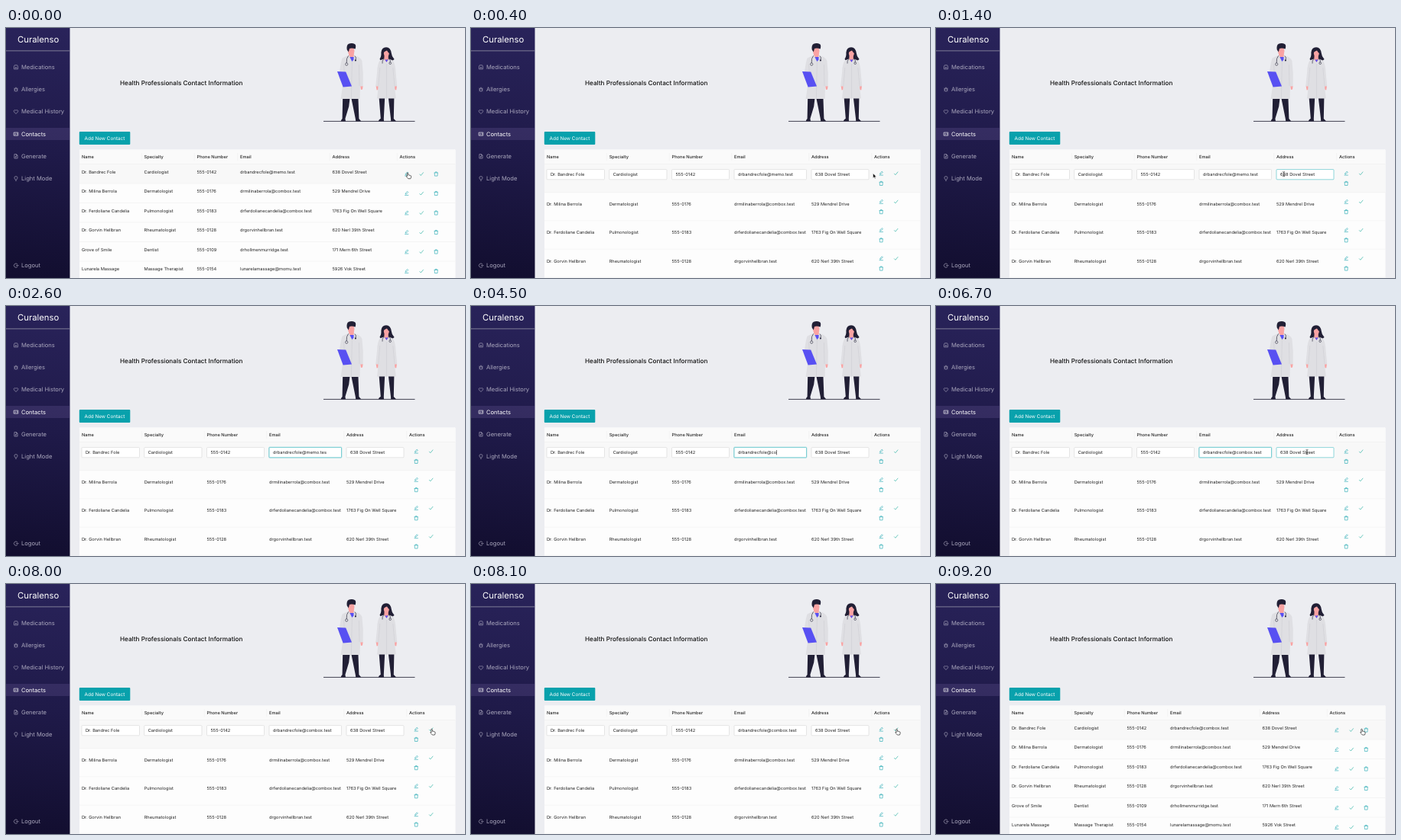
Animation, 600 px wide and 328 px high, one loop 9.3 s. Source, as an HTML page:

```html
<!DOCTYPE html>
<html lang="en">
<head>
<meta charset="utf-8">
<title>Contacts</title>
<style>
  html, body { margin: 0; width: 100%; height: 100%; overflow: hidden; background: #ecedf1; }
  svg { display: block; width: 600px; height: 328px; }
  text { font-family: Inter, Roboto, sans-serif; font-size: 5.7px; fill: #242424; text-rendering: geometricPrecision; white-space: pre; }
  .head { font-weight: 500; }
  .nav text { font-size: 7.6px; fill: #aaa7bd; }
  .nav .active text { fill: #fff; }
  .nav use { fill: none; stroke: #aaa7bd; stroke-width: .65; }
  .nav .active use { stroke: #fff; }
  .icon { fill: none; stroke: #16a3ad; stroke-width: .6; stroke-linejoin: round; }
  .check { stroke: #32b3a5; stroke-width: .7; }
  .rule { stroke: #eeeeef; stroke-width: .6; }
  .field { fill: #fff; stroke: #d6d6d6; stroke-width: .6; }
  .dark { fill: #211f35; }
  .skin { fill: #f9a3a3; }
  .coat { fill: #dfdfe3; }
  .fold { fill: none; stroke: #cbcbd1; stroke-width: .5; }
  .tube { fill: none; stroke: #2f2e41; stroke-width: .7; }
  .disc { fill: #f4f4f7; stroke: #2f2e41; stroke-width: .7; }
  .blue { fill: #5850f2; }
</style>
</head>
<body>
<svg viewBox="0 0 600 328">
  <defs>
    <linearGradient id="side" gradientUnits="userSpaceOnUse" x1="60" y1="0" x2="30" y2="328">
      <stop offset="0" stop-color="#29235a"/>
      <stop offset=".5" stop-color="#1f1a49"/>
      <stop offset="1" stop-color="#120e2f"/>
    </linearGradient>
    <path id="edit" d="M-1.6 1 L-1.3 -.3 L1 -2.6 L2.1 -1.5 L-.2 .8 Z M-2.6 2.4 H2.6"/>
    <path id="check" d="M-2.5 .2 L-.8 2 L2.6 -2.1"/>
    <path id="trash" d="M-2.6 -1.6 H2.6 M-1 -1.7 V-2.6 H1 V-1.7 M-2 -1.5 L-1.8 2.6 H1.8 L2 -1.5"/>
    <path id="medicine" d="M-2.5 -1 L-1.7 -2.5 H1.7 L2.5 -1 V2.6 H-2.5 Z M-1.1 .8 H1.1 M0 -.3 V1.9"/>
    <path id="bug" d="M-1.6 -.8 H1.6 V1 Q1.5 2.6 0 2.6 Q-1.5 2.6 -1.6 1 Z M-1.2 -1 Q-1 -2.6 0 -2.6 Q1 -2.6 1.2 -1 M-2.8 .6 H-1.6 M1.6 .6 H2.8 M-2.4 -1.8 L-1.6 -.6 M2.4 -1.8 L1.6 -.6 M-2.3 2.6 L-1.4 1.7 M2.3 2.6 L1.4 1.7"/>
    <path id="heart" d="M0 2.5 C-5 -.8 -2 -3.6 0 -1.5 C2 -3.6 5 -.8 0 2.5 Z"/>
    <path id="card" d="M-2.8 -2 H2.8 V2 H-2.8 Z M-1.7 1 Q-.7 -.2 .1 1 M-.8 -.8 V0 M1.1 -.5 H2 M1.1 .7 H2"/>
    <path id="file" d="M-2.1 -2.7 H.6 L2.1 -1.2 V2.7 H-2.1 Z M.5 -2.6 V-1.1 H2 M-1 .3 H1 M-1 1.5 H.4"/>
    <path id="bulb" d="M-1 1.5 V.9 Q-2.1 .2 -2.1 -.8 A2.1 2.1 0 0 1 2.1 -.8 Q2.1 .2 1 .9 V1.5 Z M-.8 2.8 H.8"/>
    <path id="exit" d="M1.9 -1.8 A2.6 2.6 0 1 0 1.9 1.8 M0 0 H2.9 M2 -1 L3 0 L2 1"/>
  </defs>

  <rect width="600" height="328" fill="#ecedf1"/>
  <rect width="83.5" height="328" fill="url(#side)"/>
  <rect y="131" width="83.5" height="16" fill="#8d78b8" opacity=".19"/>
  <text x="15" y="19.4" style="font-size:11.3px;fill:#fff">Curalenso</text>
  <path d="M0 29.9 H83.5" stroke="#8b88a0" stroke-width=".9"/>
  <g class="nav" id="nav"></g>

  <text x="149" y="74.9" style="font-size:8.18px;font-weight:500;fill:#111">Health Professionals Contact Information</text>

  <path d="M415 122.4 H534.5" stroke="#2f2e41" stroke-width=".9"/>
  <g id="man">
    <path class="dark" d="M440.2 91 H449.6 L448.2 103 L443.4 119 L444 122.2 H437.8 Q438 120.4 439.6 119 Z M451.2 91 H460.4 L461.4 119 L464.2 122.2 H457.2 L456.8 119 Z"/>
    <path class="skin" d="M448 30 H454.8 V37 L452.4 41.5 L448 37 Z M463.2 76 H466.6 L466 80.6 L464 81 Z"/>
    <path class="coat" d="M445.6 36.8 L448.6 36 L452.4 42 L455 36.2 Q463.6 38 465.4 43 Q467.6 60 466.6 76.5 H463 L462.6 93 H437.6 L440.6 72 L436 58 Q437.6 44 439.6 39.4 Z"/>
    <path class="fold" d="M452.4 43 L451.4 93 M461.4 48 L462 76 M441.6 47 L442.4 62"/>
    <ellipse class="skin" cx="451.2" cy="30.2" rx="4.2" ry="5.9"/>
    <path class="dark" d="M445.7 28.6 Q444.8 22.4 448 20.8 Q452 18.8 456.2 21.2 Q458 23 456.6 27.4 Q451.6 25.8 449 27.1 L447.8 31.5 Z"/>
    <path class="blue" d="M449.4 38 L454.6 38 L454.4 41.8 L452.3 44 Z"/>
    <path class="tube" d="M447.6 36.4 Q444.6 39.5 445.2 46.5 M456 36.6 Q458.4 38.5 457 42"/>
    <circle class="disc" cx="445.2" cy="47.5" r="1.6"/>
    <circle class="dark" cx="456.9" cy="42.6" r="1"/>
    <path class="blue" d="M433 57 L444.2 57.4 L452 76.4 L440.6 77.6 Z"/>
  </g>
  <g id="woman">
    <path class="dark" d="M487.6 91 H495.2 L493.8 119 L494 122.2 H486.8 Q487.4 120.3 489.8 118.8 Z M499.8 91 H507.4 L506.8 119 L510 122.2 H503.2 L503 119 Z"/>
    <path class="dark" d="M490.4 32 Q491 25.3 497 25.2 Q502.8 25.4 503.8 33 Q504.2 37.6 507.6 41 Q505 44 500.6 42.4 L492.4 41.6 Q488.6 43.6 488.6 40.2 Q490.8 37.6 490.4 32 Z"/>
    <path class="skin" d="M494.6 36 H499.8 V41.6 L497.5 45 L494.2 41.6 Z M483.6 76 H486.8 L486.6 81 L484.6 81.6 Z M507.4 76 H511 L510.2 81.4 L508.2 81 Z"/>
    <path class="coat" d="M489.4 42.2 L494 40.6 L497.5 46.4 L500.4 40.6 L505 42.2 Q508.8 45 509.4 57 L511.2 76.4 H508 L509.8 92.6 H485 L486.8 76.4 H483.2 L485.2 57 Q485.6 45 489.4 42.2 Z"/>
    <path class="fold" d="M497.5 47 V92.6 M488.8 52 L486.8 76 M505.8 52 L508 76"/>
    <ellipse class="skin" cx="497.3" cy="33" rx="3.5" ry="5"/>
    <path class="dark" d="M492.4 34 Q492 27 497.5 26.7 Q502.6 27 502.4 34 Q499 32.4 498 29.6 Q495.4 30.6 494.4 31.6 Z"/>
    <path class="blue" d="M495.4 41.6 H499.4 L497.5 45 Z"/>
    <path class="tube" d="M493.6 40.8 Q491.5 43 492 46.6 M500.8 40.8 Q503 41.8 502.2 45.4"/>
    <circle class="disc" cx="502.2" cy="46.2" r="1.3"/>
  </g>

  <rect x="95.8" y="136.1" width="66.5" height="17" rx="1" fill="#08a1ac"/>
  <text x="102.5" y="147.2" style="font-size:6.35px;fill:#fff">Add New Contact</text>

  <rect x="96" y="159.5" width="491.5" height="170" rx="1" fill="#fdfdfd"/>
  <rect x="96" y="159.5" width="491.5" height="19" rx="1" fill="#fafafa"/>
  <g id="view"></g>
  <g id="form"></g>
  <g id="cursor">
    <path id="arrow" d="M0 0 V6.2 L1.5 4.9 L2.5 7.1 L3.5 6.6 L2.5 4.5 H4.4 Z" fill="#111" stroke="#fff" stroke-width=".5"/>
    <path id="hand" transform="translate(-.5 -.6)" d="M-.8 .2 Q0 -.7 .7 .3 L1.1 3 Q2 2.4 2.5 3.2 Q3.3 2.8 3.6 3.6 Q4.6 3.4 4.6 4.5 Q4.7 6.4 3.8 7.6 H.8 Q-.4 6 -2 4.6 Q-1.8 3.5 -.4 4.3 Z" fill="#fff" stroke="#151515" stroke-width=".65"/>
    <path id="beam" d="M-1.4 -3 Q0 -3 0 -2.3 Q0 -3 1.4 -3 M0 -2.3 V2.3 M-1.4 3 Q0 3 0 2.3 Q0 3 1.4 3 M-.7 .9 H.7" fill="none" stroke="#222" stroke-width=".7"/>
  </g>
</svg>
<script>
const LOOP = 9300, OPEN = 200, SAVE = 8200, FOCUS = 2000, BLUR = 7900;
const USER = 'drbandrecfole@', OLD = 'memo.test', NEW = 'combox.test';
const byId = id => document.getElementById(id);

function add(parent, tag, attrs, content) {
  const node = document.createElementNS('http://www.w3.org/2000/svg', tag);
  for (const key in attrs) node.setAttribute(key, attrs[key]);
  if (content) node.textContent = content;
  parent.append(node);
  return node;
}
const label = (parent, x, middle, content, cls = '') =>
  add(parent, 'text', { x, y: middle + 2.05, class: cls }, content);
const icon = (parent, name, x, y) =>
  add(parent, 'use', { href: '#' + name, x, y, class: 'icon ' + name });
const show = (node, on) => { node.style.display = on ? '' : 'none'; };

[['medicine', 'Medications', 51], ['bug', 'Allergies', 80.3], ['heart', 'Medical History', 109.6],
 ['card', 'Contacts', 138.8], ['file', 'Generate', 168], ['bulb', 'Light Mode', 197.2],
 ['exit', 'Logout', 311.3]].forEach(([name, title, y]) => {
  const item = add(byId('nav'), 'g', { class: name === 'card' ? 'active' : '' });
  add(item, 'use', { href: '#' + name, x: 13, y: y + .3 });
  add(item, 'text', { x: 20, y: y + 2.8 }, title);
});

const titles = ['Name', 'Specialty', 'Phone Number', 'Email', 'Address', 'Actions'];
const contacts = [
  ['Dr. Bandrec Fole', 'Cardiologist', '555-0142', USER + OLD, '638 Dovel Street'],
  ['Dr. Milina Berrola', 'Dermatologist', '555-0176', 'drmilinaberrola@combox.test', '529 Mendrel Drive'],
  ['Dr. Ferdoliane Candelia', 'Pulmonologist', '555-0183', 'drferdolianecandelia@combox.test', '1763 Fig On Well Square'],
  ['Dr. Gorvin Hellbran', 'Rheumatologist', '555-0128', 'drgorvinhellbran.test', '620 Nerl 39th Street'],
  ['Grove of Smile', 'Dentist', '555-0109', 'drhollmenmurridge.test', '171 Mern 6th Street'],
  ['Lunarela Massage', 'Massage Therapist', '555-0154', 'lunarelamassage@momu.test', '5926 Vok Street']
];
const fieldEnds = [174.5, 256, 337.5, 438.5, 520];
const fields = [];
let emailText, viewEmail;

function buildTable(group, columns, pitch, editing) {
  add(group, 'rect', { x: 96, y: 178.5, width: 491.5, height: pitch, fill: '#f8f8f8' });
  add(group, 'path', { d: 'M96 178.5 H587.5', class: 'rule' });
  titles.forEach((title, i) => {
    label(group, columns[i], 169, title, 'head');
    if (i) add(group, 'path', { d: `M${columns[i] - 3.3} 164 v10`, class: 'rule' });
  });
  contacts.forEach((contact, r) => {
    const top = 178.5 + r * pitch;
    if (top > 327) return;
    add(group, 'path', { d: `M96 ${top + pitch} H587.5`, class: 'rule' });
    contact.forEach((value, c) => {
      const x = columns[c], inField = editing && r === 0;
      if (inField) fields.push(add(group, 'rect', {
        x, y: 185.6, width: fieldEnds[c] - x, height: 13.2, rx: .9, class: 'field'
      }));
      const middle = inField ? 192.2 : top + (editing ? 15.5 : 10);
      const text = label(group, inField ? x + 5 : x, middle, value);
      if (r === 0 && c === 3) editing ? emailText = text : viewEmail = text;
    });
    const x = columns[5] + 9.2, y = top + (editing ? 12.2 : 13);
    icon(group, 'edit', x, y);
    icon(group, 'check', x + 19.4, y);
    editing ? icon(group, 'trash', x, y + 13.2) : icon(group, 'trash', x + 38.5, y);
  });
}
buildTable(byId('view'), [99, 180.5, 249.5, 306, 426.5, 514.5], 25.5, false);
buildTable(byId('form'), [99, 180.7, 262.5, 344, 445, 527], 37.2, true);

const glow = add(byId('form'), 'rect', {
  x: 343.6, y: 185.2, width: 95.3, height: 14, rx: 1.2,
  fill: 'none', stroke: '#08a1ac', 'stroke-width': 1.2, 'stroke-opacity': .2
});
const caret = add(byId('form'), 'rect', { y: 189, width: .6, height: 6.4, fill: '#222' });

function typed(t) {
  if (t < 2600) return OLD;
  if (t < 3000) return OLD.slice(0, -1);
  if (t < 4400) return OLD.slice(0, Math.max(0, 7 - Math.floor((t - 3000) / 85)));
  return NEW.slice(0, Math.floor((t - 4400) / 100) + 1);
}

const path = [[0, 525.5, 190.7], [600, 525.5, 190.7], [1700, 428, 192], [6300, 428, 192],
  [6700, 485, 191.6], [7300, 548, 192], [7600, 557, 191], [LOOP, 557, 191]];
function pointer(t) {
  const i = path.findIndex(point => point[0] > t);
  const [t0, x0, y0] = path[i - 1], [t1, x1, y1] = path[i];
  const k = (t - t0) / (t1 - t0);
  return [x0 + (x1 - x0) * k, y0 + (y1 - y0) * k];
}

const between = (t, a, b) => t >= a && t < b;

function draw(t) {
  const editing = between(t, OPEN, SAVE), focused = between(t, FOCUS, BLUR);
  show(byId('view'), !editing);
  show(byId('form'), editing);
  emailText.textContent = USER + typed(t);
  viewEmail.textContent = USER + (t < SAVE ? OLD : NEW);

  const [x, y] = pointer(t);
  const over = fields.map((_, i) => editing && x >= +fields[i].getAttribute('x') && x <= fieldEnds[i]);
  fields.forEach((field, i) => {
    field.style.stroke = over[i] || (i === 3 && focused) ? '#45bdc3' : '';
  });
  show(glow, focused);
  glow.style.opacity = Math.min((t - FOCUS + 100) / 300, 1);

  show(caret, between(t, 2000, 2500) || between(t, 3000, 4000) || between(t, 4400, 5900));
  caret.setAttribute('x', 349.2 + emailText.getComputedTextLength());

  const kind = over.includes(true) ? 'beam' : !editing || x > 551 ? 'hand' : 'arrow';
  ['arrow', 'hand', 'beam'].forEach(name => show(byId(name), name === kind));
  show(byId('cursor'), !between(t, 2600, 6400));
  byId('cursor').setAttribute('transform', `translate(${x} ${y})`);
}

const start = performance.now();
function tick() {
  const t = (performance.now() - start) % LOOP;
  draw(Math.floor(t / 100) * 100);
  requestAnimationFrame(tick);
}
tick();
</script>
</body>
</html>
```
